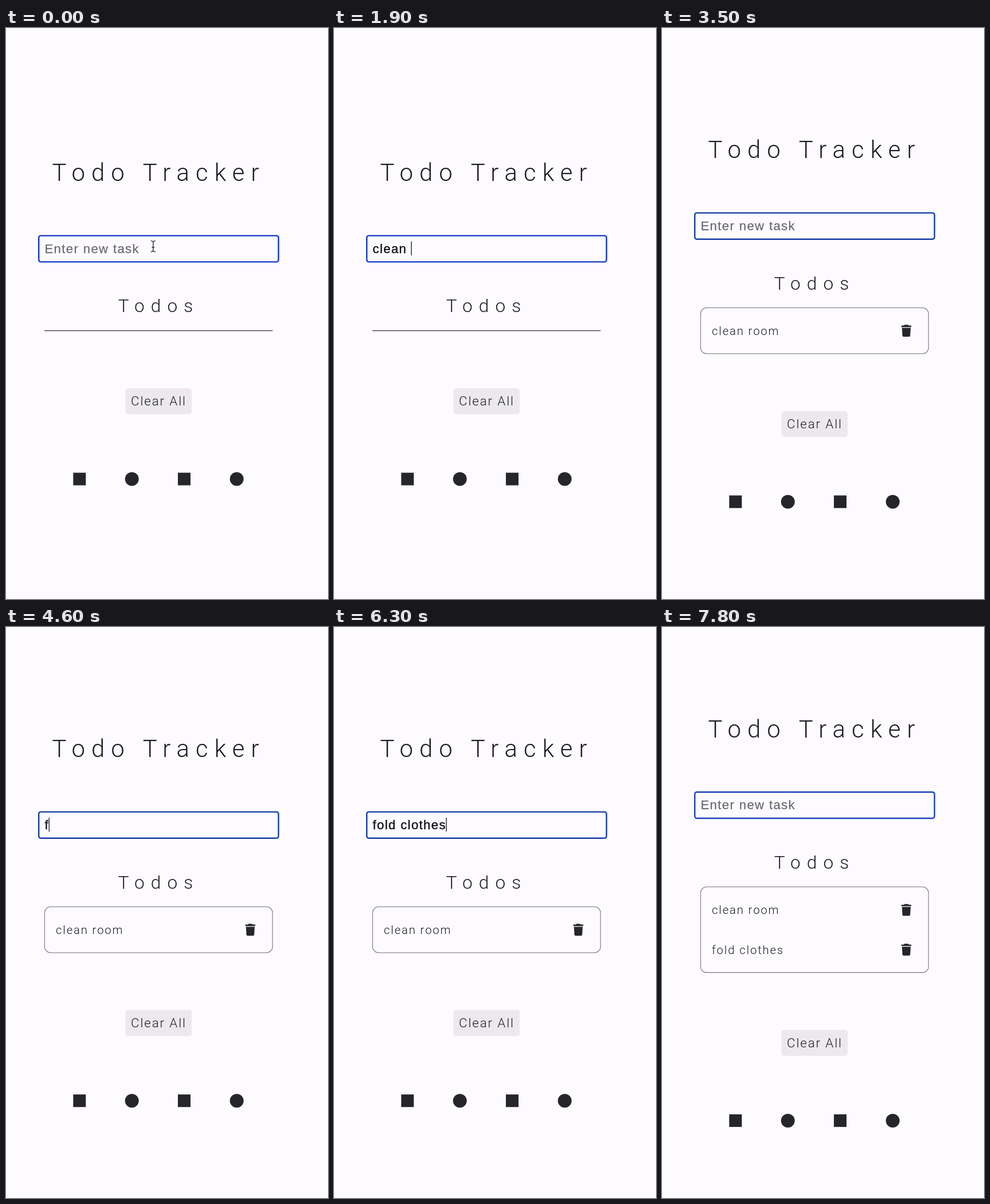
Animation, 562 px wide and 997 px high, one loop 8000 ms. Source, as an HTML page with a canvas:

```html
<!DOCTYPE html>
<html lang="en">
<head>
<meta charset="utf-8">
<title>Todo Tracker</title>
<style>
  html, body { margin: 0; width: 100%; height: 100%; overflow: hidden; background: #fdfbff; }
  canvas { display: block; width: 562px; height: 997px; }
</style>
</head>
<body>
<canvas id="stage"></canvas>
<script>
const W = 562, H = 997, LOOP = 8000, BLINK = 500;
const BG = '#fdfbff', INK = '#26252a';
const MID_X = 266.5, MID_Y = 528.6;
const FIELD_X = 67.5;
const LIGHT = 'Roboto, sans-serif';
const ARIAL = '"Liberation Sans", Arial, sans-serif';

// Typing: text and the time of each key
const drafts = [
  { text: 'clean room', keys: [1100, 1400, 1500, 1600, 1800, 1900, 2400, 2500, 2700, 2800], sent: 3500 },
  { text: 'fold clothes', keys: [4600, 4800, 5000, 5200, 5400, 5600, 5700, 5900, 6000, 6100, 6200, 6300], sent: 6700 }
];

// Layout for zero, one and two tasks
const layouts = [
  { shift: 0, rows: [], border: '#1335c8' },
  { shift: 39.7, rows: [528.6], border: '#153da2' },
  { shift: 74.4, rows: [494, 563.4], border: '#1a40bd' }
];

const canvas = document.getElementById('stage');
const ctx = canvas.getContext('2d');
const dpr = window.devicePixelRatio || 1;
canvas.width = W * dpr;
canvas.height = H * dpr;

function setFont(font, spacing) {
  ctx.font = font;
  ctx.letterSpacing = spacing + 'px';
}

function label(text, x, y, size, spacing, align = 'center') {
  setFont(`300 ${size}px ${LIGHT}`, spacing);
  ctx.textAlign = align;
  ctx.fillStyle = '#1d1c21';
  ctx.fillText(text, x, y);
}

function roundBox(x, y, w, h, r) {
  ctx.beginPath();
  ctx.roundRect(x, y, w, h, r);
}

function fieldState(t) {
  const draft = drafts.find(d => t < d.sent);
  const typed = draft ? draft.text.slice(0, draft.keys.filter(k => k <= t).length) : '';
  const lastKey = drafts.flatMap(d => d.keys).filter(k => k <= t).pop() ?? -900;
  return { typed, caret: (t - lastKey) % (2 * BLINK) < BLINK };
}

function drawField(t, dy, border) {
  const { typed, caret } = fieldState(t);
  ctx.strokeStyle = border;
  ctx.lineWidth = 2.4;
  roundBox(57.2, 362.6 + dy, 418.4, 45.8, 3.5);
  ctx.stroke();

  setFont(`22.1px ${ARIAL}`, 1.38);
  ctx.textAlign = 'left';
  const color = typed ? '#111114' : '#69686c';
  const text = typed || 'Enter new task';
  ctx.fillStyle = ctx.strokeStyle = color;
  ctx.lineWidth = typed ? 0.4 : 0.25;
  ctx.fillText(text, FIELD_X, 392.8 + dy);
  ctx.strokeText(text, FIELD_X, 392.8 + dy);

  if (caret) {
    const x = FIELD_X + (typed ? ctx.measureText(typed).width : 0);
    ctx.fillStyle = '#222';
    ctx.fillRect(x - 0.4, 372.6 + dy, 1.4, 24.4);
  }
}

function drawPointer() {
  const x = 256.8;
  ctx.strokeStyle = '#242428';
  ctx.lineWidth = 1.3;
  ctx.beginPath();
  for (const side of [-1, 1]) {
    ctx.moveTo(x + side * 4, 371.6);
    ctx.quadraticCurveTo(x, 371.6, x, 374.5);
    ctx.lineTo(x, 388);
    ctx.quadraticCurveTo(x, 390.8, x + side * 4, 390.8);
  }
  ctx.moveTo(x - 2.3, 383);
  ctx.lineTo(x + 2.3, 383);
  ctx.stroke();
}

function drawTrash(y) {
  ctx.fillStyle = INK;
  roundBox(417.6, y - 9, 17.6, 2.6, 0.9);
  ctx.fill();
  roundBox(422.3, y - 10.3, 8.2, 2.4, 1);
  ctx.fill();
  ctx.beginPath();
  ctx.moveTo(418.8, y - 5.2);
  ctx.lineTo(434, y - 5.2);
  ctx.lineTo(433.2, y + 8.6);
  ctx.quadraticCurveTo(433, y + 10.3, 431.3, y + 10.3);
  ctx.lineTo(421.5, y + 10.3);
  ctx.quadraticCurveTo(419.8, y + 10.3, 419.6, y + 8.6);
  ctx.fill();
}

function drawList(rows, shift) {
  ctx.strokeStyle = rows.length ? '#77767a' : '#4c4b50';
  ctx.lineWidth = rows.length ? 1.1 : 1.5;
  if (!rows.length) {
    ctx.beginPath();
    ctx.moveTo(67, MID_Y);
    ctx.lineTo(465.5, MID_Y);
    ctx.stroke();
    return;
  }
  const half = shift + 0.4;
  roundBox(67.4, MID_Y - half, 397.8, half * 2, 10.5);
  ctx.stroke();
  rows.forEach((y, i) => {
    label(drafts[i].text, 87, y + 7.3, 20.2, 1.9, 'left');
    drawTrash(y);
  });
}

function drawLinks(dy) {
  const y = 787.5 + dy;
  ctx.fillStyle = INK;
  for (const x of [128.3, 311]) ctx.fillRect(x - 11, y - 11, 22, 22);
  for (const x of [219.7, 402.7]) {
    ctx.beginPath();
    ctx.arc(x, y, 12, 0, Math.PI * 2);
    ctx.fill();
  }
}

function draw(t) {
  const { shift, rows, border } = layouts[drafts.filter(d => t >= d.sent).length];
  ctx.setTransform(dpr, 0, 0, dpr, 0, 0);
  ctx.fillStyle = BG;
  ctx.fillRect(0, 0, W, H);

  label('Todo Tracker', MID_X, 267 - shift, 41.8, 11.04);
  drawField(t, -shift, border);
  if (t < drafts[0].keys[0]) drawPointer();
  label('Todos', MID_X, 496.4 - shift, 31.6, 11.04);
  drawList(rows, shift);

  ctx.fillStyle = '#ebe9ec';
  roundBox(208.5, 629 + shift, 115.5, 45.5, 5);
  ctx.fill();
  label('Clear All', MID_X, 659.4 + shift, 22.3, 1.9);
  drawLinks(shift);
}

const start = performance.now();
function tick() {
  draw((performance.now() - start) % LOOP);
  requestAnimationFrame(tick);
}
tick();
</script>
</body>
</html>
```
